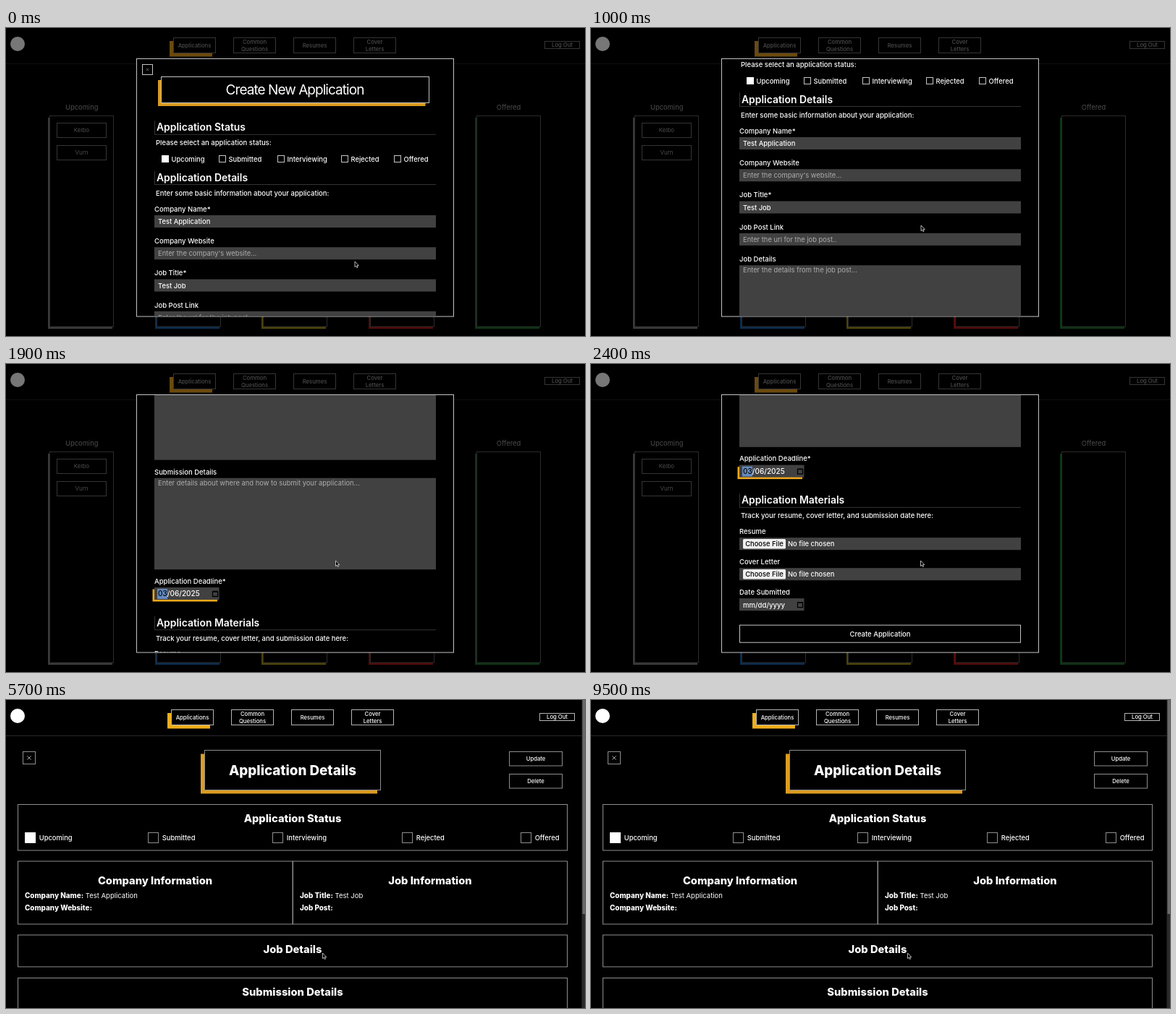
An HTML page that plays this animation: 800 by 426 pixels, repeating every 10 s.

```html
<!DOCTYPE html>
<html lang="en">
<head>
<meta charset="utf-8">
<title>Create New Application</title>
<style>
  html, body { margin: 0; width: 100%; height: 100%; overflow: hidden; background: #000; }
  svg { display: block; width: 800px; height: 426px; font: 400 9.4px Inter, "Open Sans", sans-serif; }
</style>
</head>
<body>
<svg id="stage" viewBox="0 0 800 426"></svg>
<script>
const AMBER = '#dc9c20', BRIGHT = '#f2aa1c', FIELD = '#414141', RULE = '#343434';
const EDGE = '#c4c4c4', THIN = '#8e8e8e';
const STATUSES = ['Upcoming', 'Submitted', 'Interviewing', 'Rejected', 'Offered'];

// Shape helpers; boxes are given by their left, top, right and bottom edges.
const fill = (x, y, r, b, color, extra = '') =>
  `<rect x="${x}" y="${y}" width="${r - x}" height="${b - y}" fill="${color}" ${extra}/>`;
const box = (x, y, r, b, color = EDGE, inside = '#000') =>
  fill(x + .5, y + .5, r - .5, b - .5, inside, `stroke="${color}"`);
const text = (x, y, s, size = 9.4, weight = 400, color = '#fff', extra = '') =>
  `<text x="${x}" y="${y}" font-size="${size}" font-weight="${weight}" fill="${color}" ${extra}>${s}</text>`;
const mid = (x, y, s, size, weight, color, extra = '') =>
  text(x, y, s, size, weight, color, 'text-anchor="middle" ' + extra);
const button = (x, y, r, b, s, size, weight, color, edge) =>
  box(x, y, r, b, edge) + mid((x + r) / 2, (y + b) / 2 + size * .36, s, size, weight, color);
const cross = (x, y, d, color) =>
  `<path d="M${x - d} ${y - d}l${2 * d} ${2 * d}m0 ${-2 * d}l${-2 * d} ${2 * d}" stroke="${color}" stroke-width=".8"/>`;

function nav(dx, logoutX, fg, edge, amber, logo, rule) {
  let s = `<circle cx="16" cy="22" r="10" fill="${logo}"/>` + fill(0, 49, 800, 50, rule);
  s += fill(226 + dx, 18, 285 + dx, 39.5, amber);
  [['Applications'], ['Common', 'Questions'], ['Resumes'], ['Cover', 'Letters']].forEach((lines, i) => {
    const x = 231 + dx + 83 * i;
    s += box(x, 13, x + 59, 35, edge);
    lines.forEach((line, k) =>
      s += mid(x + 29.5, lines.length > 1 ? 21.7 + 10 * k : 26.7, line, 7.7, 500, fg));
  });
  return s + button(logoutX, 18, logoutX + 49, 29, 'Log Out', 7.7, 500, fg, edge);
}

function dashboard() {
  const fg = '#4c4c4c', edge = '#353535';
  let s = nav(0, 744, fg, edge, '#6b4a0e', '#777', '#101010');
  ['#3a3a3a', '#0b2c50', '#4c430b', '#520a0a', '#0a3413'].forEach((color, i) => {
    const x = Math.round(60 + 147.6 * i);
    s += fill(x - 2, 124, x + 87, 416, color) + box(x, 121, x + 89, 413.5, '#2c2c2c');
  });
  s += mid(104.7, 113.3, 'Upcoming', 9.4, 400, fg) + mid(694.5, 113.3, 'Offered', 9.4, 400, fg);
  s += button(70, 131, 139, 152, 'Kelbo', 8, 400, fg, edge);
  return s + button(70, 162, 139, 183, 'Vurn', 8, 400, fg, edge);
}

function section(y, title, note) {
  return fill(205, y - 14, 206, y + 5, RULE) + fill(205, y + 4.5, 594, y + 5.5, RULE) +
    text(208, y, title, 13.9, 600) + text(207, y + 20, note, 9.5, 500);
}

function field(y, label, value, hint, height = 17) {
  const area = height > 17;
  return text(205, y, label, 9.5, 500) + fill(205, y + 5.2, 594, y + 5.2 + height, FIELD) +
    text(210, y + (area ? 15 : 17.2), value || hint, 9.4, value ? 500 : 400, value ? '#fff' : '#adadad');
}

function fileField(y, label) {
  return field(y, label, '', '') + fill(210, y + 7, 269, y + 20.5, '#efefef', 'rx="1.5"') +
    mid(239.5, y + 17.2, 'Choose File', 9.4, 500, '#000') + text(272, y + 17.2, 'No file chosen', 9.4, 500);
}

function dateField(y, value) {
  return fill(205, y, 294.5, y + 17, FIELD) + value +
    `<path d="M285.5 ${y + 6}h7v6.5h-7zM285.5 ${y + 5.5}h7" fill="none" stroke="#000" stroke-width="1.3"/>`;
}

function form() {
  let s = box(188, 50, 203, 65) + cross(195.5, 57.5, 1.7, '#888');
  s += fill(210, 72, 579.5, 108, AMBER) + box(214, 67, 585, 104);
  s += mid(399, 92.3, 'Create New Application', 19, 400, '#fff', 'letter-spacing="-.95"');
  s += section(142.3, 'Application Status', 'Please select an application status:');
  [215, 294, 375, 463, 536].forEach((x, i) =>
    s += box(x, 176, x + 10, 186, i ? EDGE : '#fff', i ? '#000' : '#fff') +
      text(x + 13.5, 184.6, STATUSES[i], 9.4, 500));
  s += section(211.5, 'Application Details', 'Enter some basic information about your application:');
  s += field(253.8, 'Company Name*', 'Test Application');
  s += field(298, 'Company Website', '', "Enter the company's website...");
  s += field(342.3, 'Job Title*', 'Test Job');
  s += field(386.6, 'Job Post Link', '', 'Enter the url for the job post..');
  s += field(431, 'Job Details', '', 'Enter the details from the job post...', 126.5);
  s += field(582.5, 'Submission Details', '', 'Enter details about where and how to submit your application...', 126.5);
  s += text(205, 733.7, 'Application Deadline*', 9.5, 500) + fill(202.5, 741.5, 292, 758.5, BRIGHT);
  s += dateField(739, fill(209, 741, 223, 755, '#6489bd') +
    text(210, 751.3, '<tspan fill="#000">03</tspan>/06/2025', 10, 500));
  s += section(792.7, 'Application Materials', 'Track your resume, cover letter, and submission date here:');
  s += fileField(834.3, 'Resume') + fileField(876.3, 'Cover Letter');
  s += text(205, 918.3, 'Date Submitted', 9.5, 500);
  s += dateField(923.5, text(210, 936, 'mm/dd/yyyy', 9.6, 500));
  s += `<g id="hover">${fill(200, 965, 589.5, 989.5, BRIGHT)}</g>`;
  s += button(205, 960, 594, 985, 'Create Application', 9.5, 500, '#fff');
  return s + button(205, 1004, 594, 1029, 'Set Dummy Data', 9.5, 500, '#fff');
}

function details() {
  const head = (x, y, s) => mid(x, y, s, 14.7, 800);
  const pair = (x, y, key, value = '') =>
    text(x, y, `<tspan font-weight="800" font-size="9.9">${key}:</tspan> ${value}`, 9.5);
  const panel = (x, y, r, b) => box(x, y, r, b, THIN);
  let s = fill(0, 0, 800, 426, '#000') + nav(-3, 737, '#fff', '#b4b4b4', '#eeae1c', '#fff', '#2a2a2a');
  s += panel(23, 71, 41, 89) + cross(32, 80, 2.6, '#ccc');
  s += fill(269, 74.5, 513, 129.5, AMBER) + panel(274, 69, 518, 125);
  s += mid(396, 103.7, 'Application Details', 18.8, 800);
  s += button(695, 71, 769, 91.5, 'Update', 7.7, 500, '#fff', THIN);
  s += button(695, 102, 769, 122.5, 'Delete', 7.7, 500, '#fff', THIN);
  s += panel(16, 144, 776, 208.5) + head(396, 169.3, 'Application Status');
  [26, 196, 368, 547, 711].forEach((x, i) =>
    s += box(x, 183, x + 15, 198, i ? THIN : '#fff', i ? '#000' : '#fff') +
      text(x + 19.7, 194.1, STATUSES[i], 9.4, 500));
  s += panel(16, 222.5, 396.5, 310.5) + panel(396, 222.5, 776, 310.5);
  s += head(206, 254.7, 'Company Information') + head(586, 254.7, 'Job Information');
  s += pair(26, 273.5, 'Company Name', 'Test Application') + pair(26, 291, 'Company Website');
  s += pair(406, 273.5, 'Job Title', 'Test Job') + pair(406, 291, 'Job Post');
  s += panel(16, 324.5, 776, 369.5) + head(396, 350.2, 'Job Details');
  s += panel(16, 384, 776, 440) + head(396, 409.2, 'Submission Details');
  return s + fill(795.5, 0, 800, 426, '#2a2a2a') + fill(796.5, 0, 800, 296, '#6a6a6a');
}

const $ = id => document.getElementById(id);
$('stage').innerHTML = `
  <clipPath id="clip"><rect x="181" y="43" width="437" height="355.5"/></clipPath>
  <g id="dash">${dashboard()}${box(180, 42, 619, 399.5)}
    <g clip-path="url(#clip)"><g id="form">${form()}</g></g></g>
  <g id="details">${details()}</g>
  <g id="cursor" stroke="#ddd" stroke-width=".8" stroke-linejoin="round">
    <path id="arrow" fill="#000" d="M0 0V7.6L1.7 6.1 2.9 8.6 4.1 8 3 5.6H5.3Z"/>
    <path id="hand" fill="#fff" stroke="#222" stroke-width=".7"
      d="M1 .6Q1.7 -.2 2.4 .6V3.2Q4.8 3 6 4.2V6.2L5.2 8.4H1.8L-.4 5.4Q-.2 4.4 1 5Z"/>
  </g>`;

// Keys are [time, value, ...]; values between keys are linear.
const SCROLL = [[0, 0], [450, 0], [700, 16.5], [1000, 108], [1400, 243.5], [1900, 430],
  [2200, 570], [2500, 614], [2900, 626]];
const POINTER = [[0, 482, 323], [100, 481, 321], [600, 457, 276], [1000, 456, 273], [1400, 455.5, 272],
  [2500, 455.5, 272], [3600, 436, 349.5], [4600, 436, 349.5], [4700, 437.5, 350]];

function at(keys, t) {
  const i = keys.findIndex(k => k[0] > t);
  if (i < 0) return keys[keys.length - 1].slice(1);
  const [a, b] = [keys[i - 1], keys[i]], p = (t - a[0]) / (b[0] - a[0]);
  return a.slice(1).map((v, k) => v + (b[k + 1] - v) * p);
}

const show = (id, on) => $(id).setAttribute('display', on ? 'inline' : 'none');

function draw(now) {
  const t = Math.floor(now % 10000 / 100) * 100;
  const [scroll] = at(SCROLL, t), [x, y] = at(POINTER, t);
  const open = t < 4600, over = open && y + scroll > 960 && y > 334;
  show('dash', open);
  show('details', !open);
  show('hover', over);
  show('hand', over);
  show('arrow', !over);
  $('form').setAttribute('transform', `translate(0 ${-scroll})`);
  $('cursor').setAttribute('transform', `translate(${x} ${y})`);
}

const start = performance.now();
function tick() {
  draw(performance.now() - start);
  requestAnimationFrame(tick);
}
tick();
</script>
</body>
</html>
```
